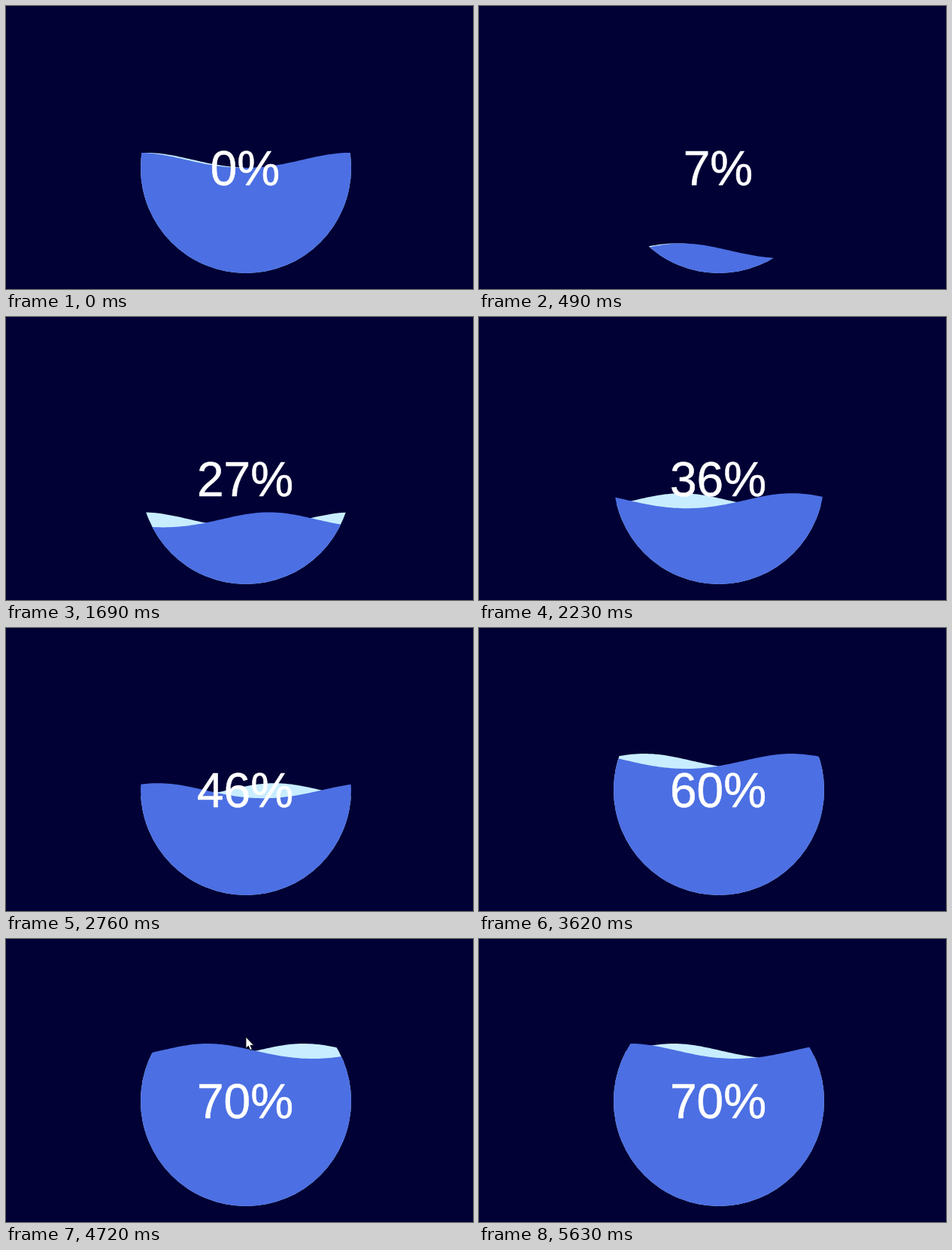
These frames come from a looping animation (621x376 px, 5.69 s). An HTML page:

```html
<!DOCTYPE html>
<html lang="en">
<head>
<meta charset="utf-8">
<title>Liquid progress</title>
<style>
  html, body { margin: 0; width: 100%; height: 100%; overflow: hidden; background: #010135; }
  svg { display: block; width: 621px; height: 376px; }
  text {
    font: 64px "Liberation Sans", Arial, sans-serif;
    fill: #fff; stroke: #fff; stroke-width: .6px; text-anchor: middle;
  }
</style>
</head>
<body>
<svg viewBox="0 0 621 376">
  <clipPath id="bowl"><circle cx="319" cy="215" r="140"/></clipPath>
  <g clip-path="url(#bowl)">
    <path id="back" fill="#c8edff"/>
    <path id="front" fill="#4c6fe3"/>
  </g>
  <text id="label" x="318" y="237.5">0%</text>
  <path id="cursor" d="M0 0V15L3.4 11.8L5.8 17.4L8.2 16.4L5.9 11H10.5Z" fill="#fff" stroke="#000" stroke-width=".8"/>
</svg>
<script>
  const LOOP = 5690;
  const TICK = 67.5;        // the picture advances in steps of this many ms
  const TICK_LEAD = 30;
  const LEFT = 179, RIGHT = 459, BOTTOM = 355;
  const WAVELENGTH = RIGHT - LEFT;
  const AMPLITUDE = 10;
  const START_LEVEL = 50;   // shown until the first step
  const GOAL = 70;
  const POINTER_IN = 68, POINTER_OUT = 73;

  const el = id => document.getElementById(id);
  const [back, front, label, cursor] = ['back', 'front', 'label', 'cursor'].map(el);

  const percentAt = k => Math.max(0, Math.min(GOAL, Math.floor(1.14 * k - 0.65)));

  // Sine with slightly narrower crests than troughs.
  function wave(crest, level) {
    const mid = BOTTOM - 2.8 * level - AMPLITUDE;
    let d = `M${LEFT} ${BOTTOM}`;
    for (let x = LEFT; x <= RIGHT; x += 4) {
      const a = (x - crest) / WAVELENGTH * 2 * Math.PI;
      const y = mid - AMPLITUDE * Math.cos(a) + Math.sin(a) ** 2;
      d += `L${x} ${y.toFixed(2)}`;
    }
    return d + `L${RIGHT} ${BOTTOM}Z`;
  }

  // The pointer sweeps in from the top left and leaves at the bottom.
  function drawPointer(k) {
    const s = k - POINTER_IN;
    const x = 32 + 183.5 * s - 20 * s * s;
    const y = 15 + 49 * s + 4.3 * s * s;
    const shown = k >= POINTER_IN && k <= POINTER_OUT;
    cursor.setAttribute('visibility', shown ? 'visible' : 'hidden');
    cursor.setAttribute('transform', `translate(${x} ${y})`);
  }

  function draw(time) {
    const k = Math.floor((time + TICK_LEAD) / TICK);
    const percent = percentAt(k);
    const level = k === 0 ? START_LEVEL : percent;

    back.setAttribute('d', wave(186 + 11 * k, level));
    front.setAttribute('d', wave(177 - 26.7 * k, level));
    label.textContent = percent + '%';
    drawPointer(k);
  }

  const start = performance.now();
  function frame() {
    draw((performance.now() - start) % LOOP);
    requestAnimationFrame(frame);
  }
  frame();
</script>
</body>
</html>
```
